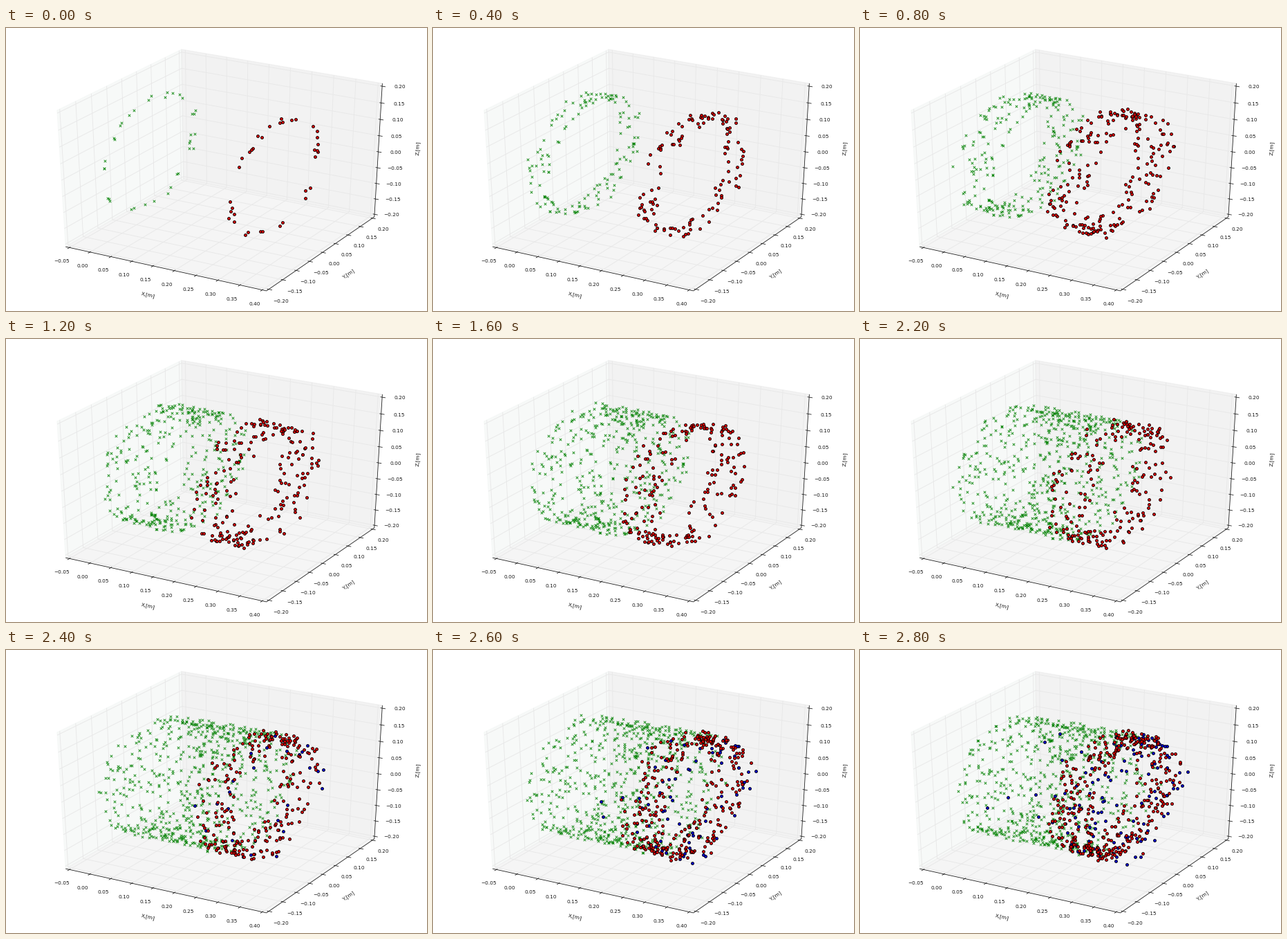
Animation, 609 px wide and 409 px high, one loop 2900 ms. Source, as a matplotlib script:

```python
import numpy as np
import matplotlib.pyplot as plt
from matplotlib.animation import FuncAnimation

W, H, DPI = 609, 409, 64
PT = 72 / DPI                      # points per pixel
FRAMES, INTERVAL = 29, 100
STEP = 0.01                        # axial travel per frame, in metres
RED_START, RED_LIFE = 0.30, 9
FIRST_RING = 36
MEETING = 24                       # frame where the two streams meet

# Camera: elevation 30, azimuth -60, distance 10 from a unit cube
EL, AZ = np.radians(30), np.radians(-60)
EYE = np.array([np.cos(EL) * np.cos(AZ), np.cos(EL) * np.sin(AZ), np.sin(EL)])
RIGHT = np.array([-np.sin(AZ), np.cos(AZ), 0])
UP = np.cross(EYE, RIGHT)
DIST = 10
CX, CY, SX, SY = 312.6, 198.7, 322, 216
EDGE = 0.5 + 1 / 48                # panes reach slightly past the limits


def project(p):
    """Cube coordinates (n, 3) -> pixel x, pixel y, scale."""
    p = np.atleast_2d(p)
    scale = DIST / (DIST - p @ EYE)
    return CX + SX * scale * (p @ RIGHT), CY - SY * scale * (p @ UP), scale


def to_cube(x, y, z):
    return np.column_stack([(x - 0.175) / 0.45, y / 0.4, z / 0.4])


def ring(rng, n, low, high):
    """Points spread round the tube by the golden angle, with some jitter."""
    angle = np.arange(n) * np.pi * (3 - 5 ** 0.5) + rng.normal(0, 0.4, n)
    radius = rng.uniform(low, high, n)
    return radius * np.cos(angle), radius * np.sin(angle)


def stream(rng, x_low, x_high, rate):
    """Birth frame and start x, y, z of a steady stream of rings."""
    n = FIRST_RING + rate * (FRAMES - 1)
    birth = np.maximum(0, (np.arange(n) - FIRST_RING) // rate + 1)
    return birth, rng.uniform(x_low, x_high, n), *ring(rng, n, 0.151, 0.170)


def debris(rng, rate, v_low, v_high):
    """Birth frame, start x, axial speed, y, z of points from the meeting."""
    birth = np.repeat(np.arange(MEETING, FRAMES), rate)
    n = len(birth)
    return (birth, rng.uniform(0.23, 0.31, n), rng.uniform(v_low, v_high, n),
            *ring(rng, n, 0.147, 0.174))


rng = np.random.default_rng(12)
green = stream(rng, -0.002, 0.006, 27)
green_end = rng.uniform(0.22, 0.30, len(green[0]))
red = stream(rng, RED_START - 0.008, RED_START + 0.002, 22)
blue_right = debris(rng, 22, 0.0, 0.013)
blue_left = debris(rng, 4, -0.05, -0.01)
red_extra = debris(rng, 32, -0.006, 0.008)


def drifting(k, birth, x, v, y, z):
    on = birth <= k
    return to_cube((x + v * (k - birth + 1))[on], y[on], z[on])


def green_points(k):
    birth, x, y, z = green
    x = x + STEP * (k - birth)
    on = (birth <= k) & (x < green_end)
    return to_cube(x[on], y[on], z[on])


def red_points(k):
    birth, x, y, z = red
    age = k - birth
    on = (age >= 0) & (age < RED_LIFE)
    main = to_cube((x - STEP * age)[on], y[on], z[on])
    return np.vstack([main, drifting(k, *red_extra)])


def blue_points(k):
    return np.vstack([drifting(k, *blue_right), drifting(k, *blue_left)])


plt.rcParams["font.family"] = "DejaVu Sans"
FONT = 7.4 * PT
fig = plt.figure(figsize=(W / DPI, H / DPI), dpi=DPI, facecolor="white")
ax = fig.add_axes([0, 0, 1, 1])
ax.set_xlim(-0.5, W - 0.5)
ax.set_ylim(H - 0.5, -0.5)
ax.axis("off")


def label(x, y, text, angle=0):
    ax.text(x, y, text, fontsize=FONT, rotation=angle, color="0.1",
            ha="center", va="center", zorder=4)


def segment(points, color, width, z):
    x, y, _ = project(points)
    ax.plot(x, y, color=color, lw=width * PT, zorder=z,
            solid_capstyle="butt", snap=False)


def pane(axis, side, shade):
    corners = []
    for s, t in [(-1, -1), (1, -1), (1, 1), (-1, 1)]:
        corners.append(np.insert([s * EDGE, t * EDGE], axis, side * EDGE))
    x, y, _ = project(corners)
    ax.fill(x, y, facecolor=shade, edgecolor=shade, alpha=0.5, lw=PT, zorder=1)


def draw_axis(axis, base, low, high, count, out, offset):
    """Grid, axis line, ticks and tick labels along one direction."""
    base, out = np.array(base) * EDGE, np.array(out)
    for i, value in enumerate(np.linspace(low, high, count)):
        c = -0.5 + i / (count - 1)
        corner = np.array([-EDGE, EDGE, -EDGE])
        corner[axis] = c
        for other in {0, 1, 2} - {axis}:
            end = corner.copy()
            end[other] *= -1
            segment([corner, end], "0.91", 0.9, 2)
        tick = base.copy()
        tick[axis] = c
        segment([tick - out / 120, tick + out / 60], "0.1", 0.8, 4)
        x, y, scale = project(tick)
        sign = "\u2212" if value < -1e-9 else ""
        label(x[0] + offset[0] * scale[0], y[0] + offset[1] * scale[0],
              f"{sign}{abs(value):.2f}")
    ends = np.array([base, base])
    ends[:, axis] = -EDGE, EDGE
    segment(ends, "0.1", 0.8, 3)


pane(0, -1, (0.945, 0.96, 0.953))
pane(1, 1, "0.90")
pane(2, -1, "0.925")
draw_axis(0, (0, -1, -1), -0.05, 0.40, 10, (0, -1, 0), (-11, 20))
draw_axis(1, (1, 0, -1), -0.20, 0.20, 9, (1, 0, 0), (16.6, 16.7))
draw_axis(2, (1, 1, 0), -0.20, 0.20, 9, (1, 0, 0), (25.6, 1.3))
label(205, 385, "X,[m]", -12)
label(495, 355, "Y,[m]", 34)
label(595, 173, "Z,[m]", 87)


def cloud(shape, size, width, z, **colors):
    return ax.scatter([], [], marker=shape, s=(size * PT) ** 2,
                      linewidths=width * PT, zorder=z, **colors)


clouds = [
    (cloud("x", 3.5, 0.8, 5, c="green"), green_points),
    (cloud("o", 4, 0.8, 6, fc="#0000c8", ec="black"), blue_points),
    (cloud("o", 4, 0.8, 7, fc="#d00000", ec="black"), red_points),
]


def update(k):
    for artist, points in clouds:
        x, y, _ = project(points(k))
        artist.set_offsets(np.column_stack([x, y]))
    return [artist for artist, _ in clouds]


anim = FuncAnimation(fig, update, frames=FRAMES, interval=INTERVAL,
                     repeat=True, repeat_delay=0, blit=False)
plt.show()
```
